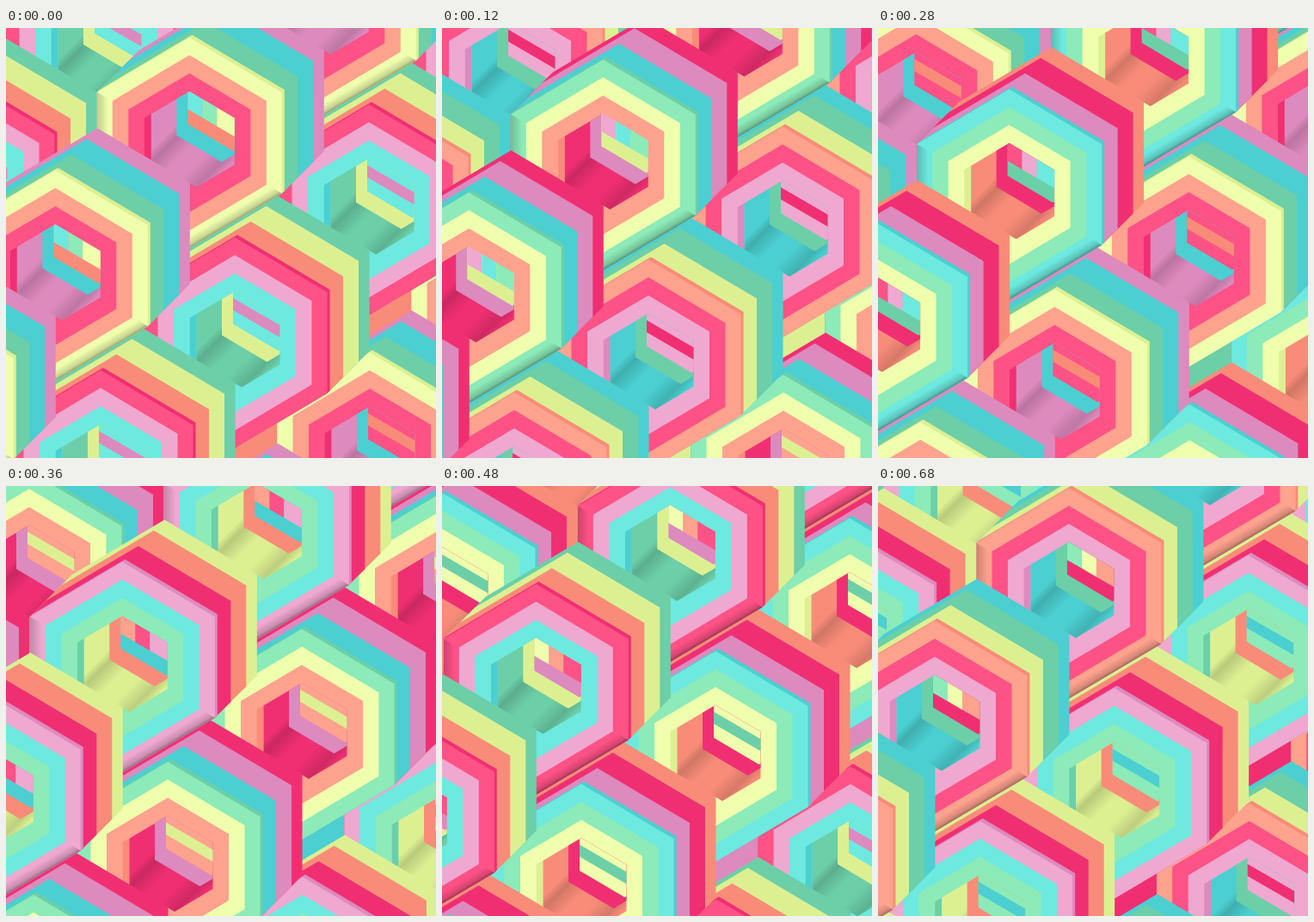
These frames come from a looping animation (500x500 px, 720 ms). An HTML page:

```html
<!DOCTYPE html>
<html>
<head>
<meta charset="utf-8">
<style>
html, body { margin: 0; width: 100%; height: 100%; overflow: hidden; background: #6ccfa8; }
svg { display: block; width: 100vw; height: 100vh; }
</style>
</head>
<body>
<svg id="stage" viewBox="0 0 500 500">
  <defs id="defs">
    <linearGradient id="left" gradientUnits="userSpaceOnUse" x1="-108" y1="0" x2="-94" y2="0">
      <stop offset="0" stop-opacity=".2"/><stop offset="1" stop-opacity="0"/>
    </linearGradient>
    <linearGradient id="under" gradientUnits="userSpaceOnUse" x1="54" y1="91.5" x2="47.5" y2="80.5">
      <stop offset="0" stop-opacity=".42"/><stop offset=".35" stop-opacity=".16"/><stop offset="1" stop-opacity="0"/>
    </linearGradient>
    <linearGradient id="crease" gradientUnits="userSpaceOnUse" x1="-59" y1="23" x2="-38" y2="44">
      <stop offset="0" stop-opacity="0"/><stop offset=".33" stop-opacity=".16"/><stop offset="1" stop-opacity="0"/>
    </linearGradient>
    <linearGradient id="fold" gradientUnits="userSpaceOnUse" x1="-14" y1="46" x2="7" y2="67">
      <stop offset="0" stop-opacity="0"/><stop offset=".66" stop-opacity=".14"/><stop offset="1" stop-opacity="0"/>
    </linearGradient>
  </defs>
  <g id="field"></g>
</svg>
<script>
const NS = 'http://www.w3.org/2000/svg';
const LOOP = 720, TICK = 40, STEP = 120;
const DRIFT = [-156, 154.5];
// pink, salmon, yellow, green, cyan, orchid
const LIGHT = ['#ff5286', '#ffa28e', '#efffad', '#8cebb8', '#6de9df', '#efa8d0'];
const DARK = ['#f02f73', '#f98c79', '#dcf092', '#6ccfa8', '#4bcfd1', '#dd8abe'];
const HOLE = 52.5, RING = 107.5;
const $ = id => document.getElementById(id);
const painted = [];

function add(parent, tag, attrs) {
  const el = document.createElementNS(NS, tag);
  for (const k in attrs) el.setAttribute(k, attrs[k]);
  return parent.appendChild(el);
}

// Corners clockwise from the top, moved d to the upper right
function hex(h, d = 0) {
  const top = h * 1.139, side = h * 0.546;
  return [[0, -top], [h, -side], [h, side], [0, top], [-h, side], [-h, -side]]
    .map(([x, y]) => [x + d, y - d]);
}

// Outline of a hexagon swept from 0 to d
function sweep(h, d) {
  const near = hex(h), far = hex(h, d);
  return [near[5], far[5], far[0], far[1], far[2], near[2], near[3], near[4]];
}

function shape(parent, points, fill) {
  return add(parent, 'polygon', { points: points.join(' '), fill });
}

// A polygon whose colour steps through the palette
function paint(parent, points, shift, tones) {
  painted.push({ el: shape(parent, points), shift, tones });
}

function cell(id, hue, front) {
  const g = add($('defs'), 'g', { id });

  paint(g, sweep(RING, 49), hue + 5, DARK);
  paint(g, sweep(RING, 36.5), hue + 4, DARK);
  paint(g, sweep(RING, 18.5), hue + 3, DARK);
  paint(g, sweep(RING, 3), hue + 2, DARK);
  paint(g, hex(RING), hue + 2, LIGHT);
  if (front) {
    shape(g, [[-107.5, -58.7], [-94, -51], [-94, 51], [-107.5, 58.7]], 'url(#left)');
    shape(g, [[0, 122.4], [107.5, 58.7], [95, 51], [0, 107]], 'url(#under)');
  }
  paint(g, hex(89.5), hue + 1, LIGHT);
  paint(g, hex(71), hue, LIGHT);

  const hole = add(g, 'g', { 'clip-path': 'url(#hole)' });
  const near = hex(HOLE), wall = hex(HOLE, 8), far = hex(HOLE, 50.5);
  paint(hole, [near[5], near[4], wall[4], [wall[4][0], -60]], hue, DARK);
  paint(hole, wall, hue + 5, DARK);
  const shade = add(hole, 'g', { 'clip-path': 'url(#floor)' });
  shape(shade, [[-60, 25], [0, -35], [15, -10], [-40, 45]], 'url(#crease)');
  shape(shade, [[-14, 46], [40, -8], [60, 14], [7, 67]], 'url(#fold)');
  paint(hole, hex(HOLE, 37.5), hue + 4, DARK);

  // View through the far end
  const x0 = far[4][0];
  const strip = (a, b, top, low) => {
    const at = (x, y) => [x, y + 0.58 * (x - x0)];
    return [at(a, top), at(b, top), at(b, low), at(a, low)];
  };
  if (front) {
    paint(hole, far, hue + 1, DARK);
    paint(hole, strip(x0, 15, -80, -39), hue + 4, LIGHT);
    paint(hole, strip(15, 32, -80, -39), hue + 3, LIGHT);
    paint(hole, strip(32, 54, -80, -39), hue + 2, LIGHT);
  } else {
    paint(hole, far, hue, LIGHT);
    paint(hole, strip(x0, 54, -52, -38), hue + 1, DARK);
  }
}

function row(id, x, y) {
  for (let n = -3; n <= 3; n++) {
    add($('field'), 'use', {
      href: '#' + id,
      transform: `translate(${x + n * DRIFT[0]} ${y + n * DRIFT[1]})`
    });
  }
}

shape(add($('defs'), 'clipPath', { id: 'hole' }), hex(HOLE));
shape(add($('defs'), 'clipPath', { id: 'floor' }), hex(HOLE, 8));
cell('top', 0, true);
cell('mid', 4, false);
cell('low', 0, false);

// Slit left open below the middle row
paint(add($('defs'), 'g', { id: 'gap' }), [[-4, 80], [80, 80], [80, 165], [-4, 165]], 7, DARK);

row('mid', 105, 28);
row('gap', 422, 211.5);
row('low', 423, 500);
row('mid', 422, 211.5);
row('top', 213.3, 133.5);

function draw(ms) {
  const t = Math.floor((ms % LOOP) / TICK) * TICK;
  const turn = Math.floor(t / STEP), p = t / LOOP;
  $('field').setAttribute('transform', `translate(${DRIFT[0] * p} ${DRIFT[1] * p})`);
  for (const { el, shift, tones } of painted) {
    el.setAttribute('fill', tones[(turn + shift) % 6]);
  }
}

const start = performance.now();
function loop() {
  draw(performance.now() - start);
  requestAnimationFrame(loop);
}
loop();
</script>
</body>
</html>
```
